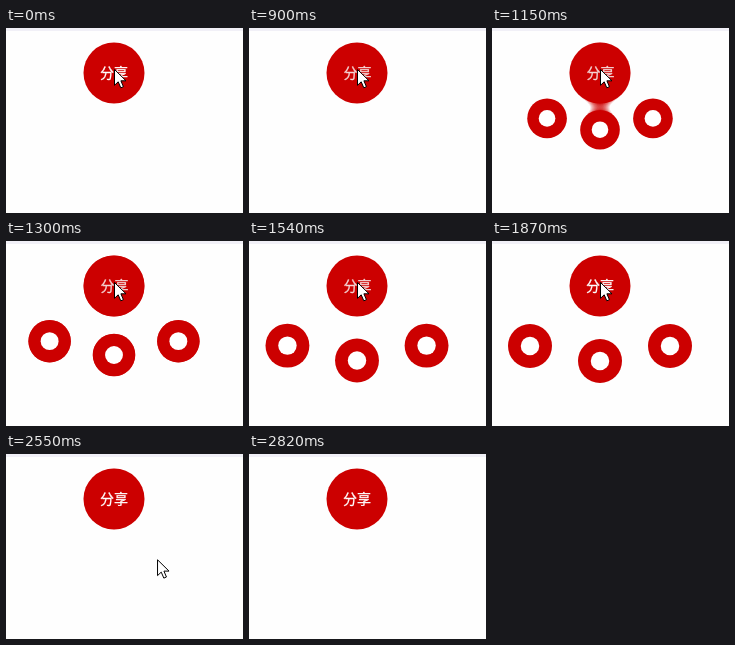
Write an HTML page that moves like this. It is 237 px wide and 185 px high and loops after 3.14 s.

```html
<!DOCTYPE html>
<html lang="zh-CN">
<head>
<meta charset="utf-8">
<title>分享</title>
<style>
  html, body { margin: 0; height: 100%; overflow: hidden; background: #fefefe; }
  svg { display: block; width: 100vw; height: 100vh; }
  text { font: 14px "Noto Sans CJK SC", "Noto Sans CJK", sans-serif; text-anchor: middle; }
</style>
</head>
<body>
<svg viewBox="0 0 237 185">
  <defs>
    <filter id="goo" filterUnits="userSpaceOnUse" x="0" y="0" width="237" height="185"
            color-interpolation-filters="sRGB">
      <feGaussianBlur id="blur" in="SourceGraphic" stdDeviation="8"/>
      <feColorMatrix values="0 0 0 0 .8  0 0 0 0 0  0 0 0 0 0  0 0 0 5 -2.1"/>
    </filter>
  </defs>
  <rect width="237" height="3" fill="#f1f0f7"/>
  <g id="bridges"></g>
  <g id="discs" fill="#c00"></g>
  <g id="icons" fill="#fff"></g>
  <circle cx="108" cy="45" r="30.5" fill="#c00"/>
  <text id="label" y="50" stroke-width=".3">分享</text>
  <path id="cursor" d="M.5 .5V16.3L4.2 12.8L6.8 18.8L9.4 17.7L6.9 11.8H12Z"
        fill="#fff" stroke="#000" stroke-linejoin="round"/>
</svg>
<script>
const LOOP = 3140;
const HUB = { cx: 108, cy: 45, r: 30.5 };
const ITEMS = [[-70, 60], [0, 75], [70, 60]];
const OPEN = 905, MOVE = 990, SETTLED = 1870, CLOSE = 2240, SPAN = 1000;
const LEAVE = 2340, CORNER = 2765, GONE = 2820;

const $ = id => document.getElementById(id);
const clamp = v => Math.min(1, Math.max(0, v));
const quintOut = u => 1 - (1 - clamp(u)) ** 5;
const smooth = u => u * u * (3 - 2 * u);
const set = (el, attrs) => {
  for (const k in attrs) el.setAttribute(k, attrs[k]);
};
const addCircle = id =>
  $(id).appendChild(document.createElementNS("http://www.w3.org/2000/svg", "circle"));

const [bridges, discs, icons] =
  ["bridges", "discs", "icons"].map(id => ITEMS.map(() => addCircle(id)));
set(addCircle("bridges"), HUB);

function spread(t) {
  if (t < MOVE) return 0;
  return t < CLOSE ? quintOut((t - OPEN) / SPAN) : 1 - quintOut((t - CLOSE) / SPAN);
}

function draw(t) {
  const p = spread(t);
  const r = 22 - 9 * (1 - p);
  ITEMS.forEach(([dx, dy], i) => {
    const at = { cx: HUB.cx + dx * p, cy: HUB.cy + dy * p };
    set(bridges[i], { ...at, r });
    set(discs[i], { ...at, r });
    set(icons[i], { ...at, r: r * 0.42 });
  });

  // The goo softens as the discs come closer to the hub.
  const sigma = Math.min(11, 32 * (1 - p));
  set($("blur"), { stdDeviation: Math.max(sigma, 1) });
  set($("bridges"), {
    filter: "url(#goo)",
    visibility: sigma > 1 && p > 0.1 ? "visible" : "hidden"
  });

  const dim = t >= 900 && t < SETTLED;
  const ink = dim ? "#f4d4d4" : "#fff";
  set($("label"), { x: dim ? 108.6 : 108, fill: ink, stroke: ink });

  const k = smooth(clamp((t - LEAVE) / (CORNER - LEAVE)));
  set($("cursor"), {
    transform: `translate(${108 + 87 * k} ${41 + 130 * k})`,
    visibility: t < GONE ? "visible" : "hidden"
  });
}

const start = performance.now();
function tick() {
  draw((performance.now() - start) % LOOP);
  requestAnimationFrame(tick);
}
tick();
</script>
</body>
</html>
```
